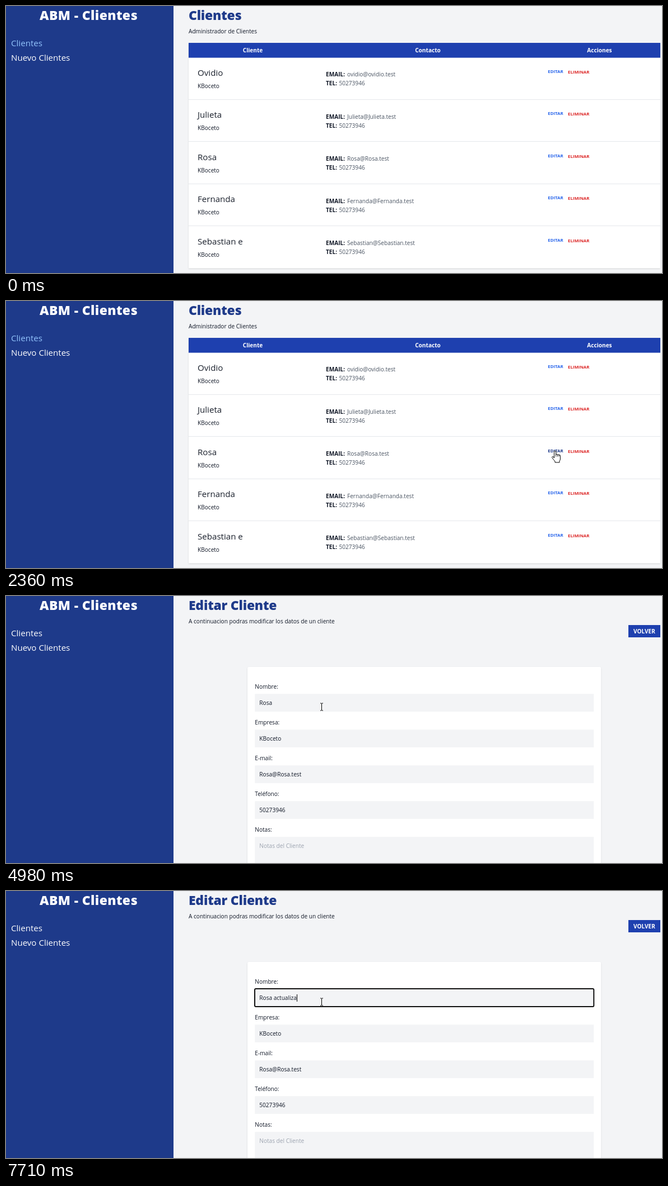
An HTML page for the animation above (8 s loop, 1171 by 478 pixels).

```html
<!DOCTYPE html>
<html lang="es">
<head>
<meta charset="utf-8">
<title>ABM - Clientes</title>
<style>
html, body { margin: 0; width: 100%; height: 100%; overflow: hidden; background: #f3f4f6; }
svg { display: block; }
text { font: 10.1px "Open Sans", "Noto Sans", sans-serif; fill: #111827; white-space: pre; }
.title { font-size: 22.9px; font-weight: 800; letter-spacing: -.2px; }
.brand { letter-spacing: .4px; }
.link { font-size: 15.1px; }
.name { font-size: 15.1px; fill: #1a202c; }
.bold { font-weight: 700; }
.small { font-size: 7.85px; font-weight: 700; }
.white { fill: #fff; }
.navy { fill: #1e3a8a; }
.gray { fill: #4b5563; }
.hint { fill: #9ca3af; }
.blue { fill: #2563eb; }
.red { fill: #dc2626; }
.mid { text-anchor: middle; }
.card { fill: #fff; filter: drop-shadow(0 1px 1px rgba(0, 0, 0, .13)); }
</style>
</head>
<body>
<svg id="stage" width="1171" height="478" viewBox="0 0 1171 478">
  <rect width="1171" height="478" fill="#f3f4f6"/>
  <rect width="299" height="478" fill="#1e3a8a"/>
  <g id="side"></g>
  <g id="list"></g>
  <g id="edit"></g>
  <circle id="click" r="10.7" fill="#ff0" fill-opacity=".47"/>
  <g id="cursor" stroke="#000" fill="#fff" stroke-linejoin="round">
    <path id="arrow" d="M.5.5V14.7L3.8 11.5 6 16.6 8.1 15.7 6 10.8H10.5Z"/>
    <g id="hand" transform="translate(-6 0)">
      <path d="M4.5 13V2a1.6 1.6 0 0 1 3.2 0V7.2q.1-1 1.4-1 1.4 0 1.4 1.3.1-.8 1.3-.8 1.3 0 1.3 1.4.1-.7 1-.7 1.3 0 1.3 1.6V15q0 2-1.4 3.5V21H6V19Q4 17 1 12.7 0 11 1.4 10.4 2.8 10 4.5 13Z"/>
      <path d="M7.7 7V10.5M10.5 7.5V10.5M13.1 8V10.5" fill="none" stroke-width=".9"/>
    </g>
    <path id="beam" d="M-2.5-6.5H-.7L0-6 .7-6.5H2.5M0-6V6M-2.5 6.5H-.7L0 6 .7 6.5H2.5" fill="none"/>
  </g>
</svg>
<script>
const LOOP = 8000, PAGE_AT = 2760, FOCUS_AT = 5040;
const $ = id => document.getElementById(id);
const text = (x, y, cls, s, id = '') => `<text x="${x}" y="${y}" class="${cls}" id="${id}">${s}</text>`;
const rect = (x, y, w, h, rest) => `<rect x="${x}" y="${y}" width="${w}" height="${h}" ${rest}/>`;
const show = (el, on) => { el.style.display = on ? '' : 'none'; };

const company = 'KBoceto', phone = '50273946', person = 'Rosa', added = ' actualiza';
const clients = [
  ['Ovidio', 'ovidio@ovidio.test'],
  ['Julieta', 'Julieta@Julieta.test'],
  [person, 'Rosa@Rosa.test'],
  ['Fernanda', 'Fernanda@Fernanda.test'],
  ['Sebastian e', 'Sebastian@Sebastian.test']
];

$('side').innerHTML =
  text(147.5, 25, 'title brand white mid', 'ABM - Clientes') +
  text(9, 72, 'link', 'Clientes', 'home') +
  text(9, 98, 'link white', 'Nuevo Clientes');

function clientRow([name, email], i) {
  const low = y => Math.floor(y + 75.5 * i), near = y => Math.round(y + 75.5 * i);
  return text(342, low(125), 'name', name) +
    text(342, low(147), '', company) +
    text(571, near(126), 'bold', 'EMAIL:') + text(609, near(126), 'gray', email) +
    text(571, near(142), 'bold', 'TEL:') + text(594.5, near(142), 'gray', phone) +
    text(967.3, low(120), 'small blue', 'EDITAR', 'edit' + i) +
    text(1003, low(121), 'small red', 'ELIMINAR') +
    (i < 4 ? rect(326, low(167), 842, 1, 'fill="#e5e7eb"') : '');
}

$('list').innerHTML =
  text(326, 25, 'title navy', 'Clientes') +
  text(326, 49, '', 'Administrador de Clientes') +
  rect(326, 66, 842, 403.5, 'class="card"') +
  rect(326, 66, 842, 26.6, 'fill="#1e40af"') +
  text(440.5, 83, 'bold white mid', 'Cliente') +
  text(753, 83, 'bold white mid', 'Contacto') +
  text(1059.5, 83, 'bold white mid', 'Acciones') +
  clients.map(clientRow).join('');

const fields = [
  ['Nombre:', person], ['Empresa:', company], ['E-mail:', clients[2][1]],
  ['Teléfono:', phone], ['Notas:', 'Notas del Cliente']
];

$('edit').innerHTML =
  text(326, 25, 'title navy', 'Editar Cliente') +
  text(326, 49, '', 'A continuacion podras modificar los datos de un cliente') +
  rect(1111, 52, 57, 22, 'fill="#1e40af"') +
  text(1139.5, 67, 'bold white mid', 'VOLVER') +
  rect(431, 127, 631.3, 400, 'rx="2.7" class="card"') +
  fields.map(([label, value], i) => {
    const y = 64 * i;
    return text(444.3, y + 166, '', label) +
      rect(444.3, y + 175.3, 605, i < 4 ? 31.7 : 80, 'fill="#f3f4f6"') +
      text(452.3, y + 195, i < 4 ? '' : 'hint', value, 'value' + i);
  }).join('') +
  `<g id="focus">${rect(444, 175, 605.3, 32, 'rx="2" fill="none" stroke="#101010" stroke-width="2"')}</g>` +
  rect(0, 185, 1, 13, 'id="caret" fill="#000"');

// Pointer path: time, x, y
const path = [
  [790, 1060, 468], [1100, 1016, 362], [1300, 994, 310], [1550, 985, 288],
  [1620, 985.5, 284.5], [2030, 980, 268], [4029, 980, 268], [4030, 972, 266],
  [4300, 820, 258], [4550, 640, 250], [4700, 580, 215], [4780, 564, 201], [4980, 563.5, 198.5]
];
const clicks = [[2300, 2360], [FOCUS_AT, 5110]];
const keys = [6300, 6500, 6760, 7040, 7140, 7240, 7440, 7530, 7620, 7710];

function snap(t) {
  const [start, tick] = t < 4030 ? [790, 68.8] : [4030, 67.8];
  return start + Math.floor((t - start) / tick + .001) * tick;
}

function pointer(t) {
  const s = t >= 2030 && t < 4030 ? 2030 : snap(t);
  let i = path.findIndex(k => k[0] > s);
  if (i < 0) return path[path.length - 1].slice(1);
  if (i === 0) i = 1;
  const [t0, x0, y0] = path[i - 1], [t1, x1, y1] = path[i];
  const p = Math.max(0, (s - t0) / (t1 - t0));
  return [x0 + (x1 - x0) * p, y0 + (y1 - y0) * p];
}

function shape(t, y) {
  if (t < 4030) return y < 273 ? 'hand' : 'arrow';
  return (y > 239 && y < 271) || (y > 175 && y < 207) ? 'beam' : 'arrow';
}

function draw(t) {
  const onEdit = t >= PAGE_AT;
  show($('list'), !onEdit);
  show($('edit'), onEdit);
  $('home').style.fill = onEdit ? '#fff' : '#93c5fd';

  const [x, y] = pointer(t), kind = shape(t, y);
  show($('cursor'), t >= 790);
  $('cursor').setAttribute('transform', `translate(${Math.round(x * 2) / 2} ${Math.round(y * 2) / 2})`);
  for (const id of ['arrow', 'hand', 'beam']) show($(id), id === kind);
  $('edit2').style.fill = kind === 'hand' ? '#1e3a8a' : '';

  show($('click'), clicks.some(([a, b]) => t >= a && t < b));
  $('click').setAttribute('cx', x);
  $('click').setAttribute('cy', y);

  const value = $('value0');
  value.textContent = person + added.slice(0, keys.filter(k => t >= k).length);
  show($('focus'), t >= FOCUS_AT);
  show($('caret'), t >= FOCUS_AT && (t < 5570 || t >= 6100));
  if (onEdit) $('caret').setAttribute('x', Math.round(452.3 + value.getComputedTextLength()));
}

const begin = performance.now();
function frame() {
  draw((performance.now() - begin) % LOOP);
  requestAnimationFrame(frame);
}
frame();
</script>
</body>
</html>
```
